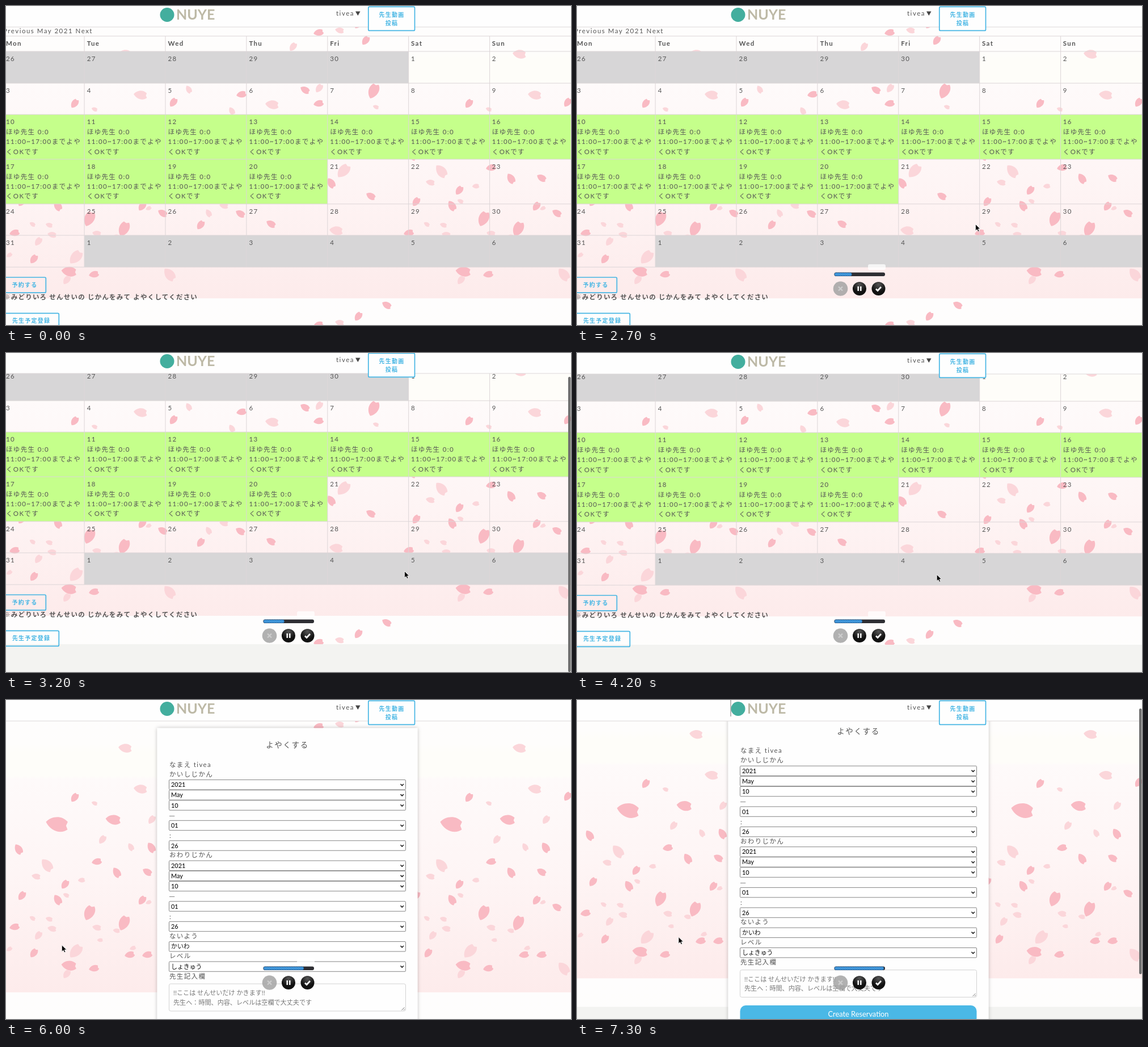
Write an HTML page that moves like this. It is 996 px wide and 562 px high and loops after 7.4 s.

```html
<!DOCTYPE html>
<html lang="ja">
<head>
<meta charset="utf-8">
<title>よやく</title>
<style>
html, body { margin: 0; width: 100%; height: 100%; overflow: hidden; background: #fff; }
svg { display: block; width: 100%; height: 100%; }
text { font: 11.5px Lato, 'Noto Sans CJK JP', 'Noto Sans CJK', sans-serif; letter-spacing: 1.35px; fill: #555; white-space: pre; }
.bold { font-weight: 700; }
.nav { letter-spacing: 1.5px; }
.note { font-weight: 700; letter-spacing: 1.22px; }
.dash { font-family: 'Noto Sans CJK JP', 'Noto Sans CJK', sans-serif; }
.btn { font-size: 10px; font-weight: 700; letter-spacing: 1.2px; fill: #46b6e4; text-anchor: middle; }
.pick { font-size: 10.9px; font-weight: 500; letter-spacing: 0; fill: #111; }
.hint { font-size: 11.1px; letter-spacing: 0; fill: #777; }
.title { font-size: 13.5px; letter-spacing: 1.6px; text-anchor: middle; }
.submit { font-size: 12.8px; letter-spacing: 0; fill: #fff; text-anchor: middle; }
.word { font-size: 25px; font-weight: 700; letter-spacing: 0; fill: #bdb9a6; }
.status { font-size: 8.6px; letter-spacing: .15px; fill: #eee; }
</style>
</head>
<body>
<svg id="stage" viewBox="0 0 996 562" preserveAspectRatio="none"></svg>
<script>
const LOOP = 7400, STEP = 100;
const DARK = '#f9bac3', PALE = '#fbd6da';
const stage = document.getElementById('stage');

const rect = (x, y, w, h, fill, more = '') =>
  `<rect x="${x}" y="${y}" width="${w}" height="${h}" fill="${fill}" ${more}/>`;
const line = (x1, y1, x2, y2, color = '#dcd5d7') =>
  `<path d="M${x1} ${y1}L${x2} ${y2}" stroke="${color}" fill="none"/>`;
// y is the optical middle of the line
const text = (s, x, y, cls = '') => `<text x="${x}" y="${y + 4.2}" class="${cls}">${s}</text>`;
const outline = (x, y, w, h) => rect(x, y, w, h, 'none', 'rx="2" stroke="#46b6e4" stroke-width="1.7"');

// colour, length, angle, centres
const petals = [
  [DARK, 40, 12, [[90, 219]]],
  [DARK, 27, 8, [[189, 211], [111, 468]]],
  [DARK, 28, -66, [[147, 375], [648, 150], [208, 393]]],
  [DARK, 18, -55, [[121, 172], [104, 325], [28, 345], [240, 353], [49, 446], [295, 170], [343, 386], [621, 32], [634, 61]]],
  [DARK, 20, 58, [[22, 263], [256, 260], [195, 304], [91, 352], [573, 312]]],
  [DARK, 18, -12, [[160, 285], [218, 449], [249, 449], [155, 473], [15, 400], [415, 156], [551, 172], [551, 47]]],
  [DARK, 18, 30, [[249, 303], [643, 335], [467, 384], [413, 366], [276, 365], [671, 12], [527, 148]]],
  [PALE, 24, 8, [[237, 157], [469, 174], [582, 396], [210, 85]]],
  [PALE, 28, -48, [[123, 443], [595, 291]]],
  [PALE, 26, 50, [[72, 291], [288, 473]]],
  [PALE, 17, -54, [[57, 415], [107, 483], [170, 246], [257, 211], [506, 72], [552, 145]]],
  [PALE, 15, 60, [[322, 147], [398, 185], [220, 259], [357, 365]]],
  [PALE, 16, 12, [[53, 311], [81, 403], [588, 43], [384, 352], [160, 401]]],
  [PALE, 11, 20, [[156, 182], [652, 178]]]
];

function tile() {
  const shape = 'M-.5 0C-.34-.28 .1-.46 .44-.2L.4-.02L.5.13C.24.42-.24.34-.5 0Z';
  const petal = (x, y, size, angle, color) =>
    `<path d="${shape}" fill="${color}" transform="translate(${x} ${y}) rotate(${angle}) scale(${size})"/>`;
  let marks = petals.map(([color, size, angle, spots]) =>
    spots.map(([x, y]) => petal(x, y, size, angle, color)).join('')).join('');
  // faint small petals between the large ones
  let seed = 7;
  const rnd = () => (seed = seed * 16807 % 2147483647) / 2147483647;
  for (let i = 0; i < 9; i++)
    marks += petal(6 + i * 29 + rnd() * 16, 310 + rnd() * 140, 10 + rnd() * 4, -60 + rnd() * 120, PALE);

  const stops = [[0, '#fefdfd'], [.15, '#fefdfc'], [.18, '#fefdf9'], [.26, '#fefdf9'], [.27, '#fefafa'], [.6, '#fef5f5'], [1, '#fdebeb']]
    .map(([at, c]) => `<stop offset="${at}" stop-color="${c}"/>`).join('');
  return `<linearGradient id="blush" x2="0" y2="1">${stops}</linearGradient>
    <g id="tile">${marks}</g>
    <pattern id="hatch" width="3" height="3" patternUnits="userSpaceOnUse">
      ${rect(0, 0, 3, 3, '#2280cc')}<path d="M0 3L3 0" stroke="#79bdf0"/></pattern>
    <radialGradient id="ink" cy=".2" r=".9"><stop stop-color="#555"/><stop offset=".6" stop-color="#111"/></radialGradient>
    <filter id="soft" x="-10%" width="120%"><feDropShadow dx="0" dy="0" stdDeviation="3" flood-opacity=".25"/></filter>`;
}

function backdrop() {
  let out = '';
  for (const y of [0, 515]) {
    out += rect(0, y, 996, 515, 'url(#blush)');
    for (const x of [-695, 0, 695]) out += `<use href="#tile" x="${x}" y="${y}"/>`;
  }
  return out + rect(0, 565, 996, 300, '#f3f3f1');
}

function calendar() {
  const rows = [80, 136, 191.2, 270, 348.8, 404, 460];
  const colX = c => -4.8 + 142.9 * c;
  let fills = '', words = '', grid = '';
  ['Mon', 'Tue', 'Wed', 'Thu', 'Fri', 'Sat', 'Sun'].forEach((d, c) => {
    words += text(d, 142.8 * c, 66, 'bold');
    if (c) grid += line(colX(c), 53, colX(c), 460);
  });
  for (let i = 0; i < 42; i++) {
    const c = i % 7, r = Math.floor(i / 7), y = rows[r], h = rows[r + 1] - y;
    const day = i - 4, inMonth = day > 0 && day < 32, open = day > 9 && day < 21;
    const num = day < 1 ? day + 30 : day > 31 ? day - 31 : day;
    const x = 142.8 * c;
    if (!inMonth || open) fills += rect(colX(c), y, 142.9, h, open ? '#c5ff8b' : '#d7d6d7');
    words += text(num, x, y + 13);
    if (open) ['ほゆ先生 0:0', '11:00~17:00までよや', 'くOKです'].forEach((s, k) =>
      words += text(s, x, y + 30.3 + 17.4 * k));
  }
  for (const y of [53, ...rows]) grid += line(0, y, 996, y);
  return fills + grid + words + text('Previous May 2021 Next', -5, 44, 'nav')
    + `<g id="book">${outline(-5, 478, 75.3, 27.2)}${text('予約する', 33, 491, 'btn')}</g>`
    + text('※みどりいろ せんせいの じかんをみて よやくしてください', -4, 513, 'note')
    + outline(-5, 541.4, 98.3, 27) + text('先生予定登録', 44.5, 554, 'btn');
}

function picker(s, y) {
  return rect(287.5, y - 8.7, 417, 17.4, '#fff', 'rx="1.5" stroke="#858585"')
    + text(s, 291, y - .2, 'pick')
    + `<path d="M695.5 ${y - 1.3}l2.7 2.8 2.7-2.8" stroke="#222" stroke-width="1.6" fill="none"/>`;
}

function form() {
  const times = y => ['2021', 'May', '10'].map((s, i) => picker(s, y + 18.1 * i)).join('')
    + text('—', 287.5, y + 54, 'dash') + picker('01', y + 71.7) + text(':', 288, y + 89.5) + picker('26', y + 107.2);
  return rect(266.5, 49.5, 459, 700, '#fefefe', 'filter="url(#soft)"')
    + text('よやくする', 496, 80, 'title')
    + text('なまえ tivea', 288, 113.5) + text('かいしじかん', 288, 130.5) + times(149.3)
    + text('おわりじかん', 288, 272.8) + times(291.8)
    + text('ないよう', 288, 415.5) + picker('かいわ', 434.3)
    + text('レベル', 288, 451) + picker('しょきゅう', 469.6)
    + text('先生記入欄', 288, 486.5)
    + rect(287.5, 500, 417, 48, '#fefefe', 'rx="3" stroke="#d2d2d2"')
    + text('!!ここは せんせいだけ かきます!!', 295, 516, 'hint')
    + text('先生へ：時間、内容、レベルは空欄で大丈夫です', 295, 532.6, 'hint')
    + '<path d="M697.5 546.5l5-5M701 546.5l2-2" stroke="#777"/>'
    + rect(287.5, 562.5, 417, 32, '#4ab8e6', 'rx="10"')
    + text('Create Reservation', 496, 578, 'submit');
}

function header() {
  return rect(0, -2, 996, 39, '#fefefe') + line(0, 37, 996, 37, '#ddd8d9')
    + '<circle cx="284" cy="15.5" r="12.5" fill="#43ae9e"/>' + text('NUYE', 300, 20, 'word')
    + text('tivea', 582, 13, 'nav') + '<path d="M616 9.5h8.5l-4.2 7.5z" fill="#444"/>'
    + rect(638.8, 1.4, 81.7, 42, '#fefefe') + outline(638.8, 1.4, 81.7, 42)
    + text('先生動画', 680, 15, 'btn') + text('投稿', 680, 29.3, 'btn');
}

function recorder() {
  const knob = x => `<circle cx="${x}" cy="498" r="12" fill="url(#ink)"/>`;
  return rect(513, 455, 31, 10, '#fff', 'rx="3" opacity=".75"')
    + rect(453.5, 469.5, 89.5, 6.5, '#2e2e33', 'rx="3"')
    + rect(454, 470, 0, 5.5, 'url(#hatch)', 'id="fill" rx="2.5" stroke="#1b5f9e" stroke-width=".6"')
    + '<circle cx="464.5" cy="498" r="12.8" fill="#a3a3a3" opacity=".85"/>'
    + '<path d="M461 494.5l7 7m0-7l-7 7" stroke="#ccc" stroke-width="2.4"/>'
    + knob(498) + '<path d="M495.7 494v8m4.6-8v8" stroke="#fff" stroke-width="2.4"/>'
    + knob(531.5) + '<path d="M527 498.5l3 3 6-6.5" stroke="#fff" stroke-width="2.6" fill="none"/>';
}

stage.innerHTML = `<defs>${tile()}</defs>
  <g id="page">
    <g id="scroll">${backdrop()}<g id="cal">${calendar()}</g><g id="form">${form()}</g></g>
    ${header()}
  </g>
  <g id="caret">${line(271, 0, 271, 29, '#777')}</g>
  ${rect(991, 0, 4.5, 0, '#6f6f6f', 'id="thumb" rx="2.2"')}
  <g id="status">${rect(-4, 550, 173, 14, '#8d8d8d', 'rx="2"')}${text('localhost:3000/tweets/5/reservations/new', -2, 556.5, 'status')}</g>
  <g id="rec">${recorder()}</g>
  <path id="arrow" d="M0 0V11.6L2.7 9.1 4.5 13 6.5 12.1 4.8 8.3H8.4Z" fill="#000" stroke="#fff" stroke-width=".8"/>
  <path id="hand" d="M-2.6 0V-4.6q1.1-1.5 2.2 0V-1.2q1-.9 1.9.1q1-.7 1.8.3q1.3-.5 1.6.8V3.4L3.6 6.4H-1.6L-5-.2q.6-1.4 2.4.8z" fill="#fff" stroke="#111" stroke-width="1"/>`;

const el = {};
stage.querySelectorAll('[id]').forEach(n => el[n.id] = n);
const show = (n, on) => n.setAttribute('display', on ? 'inline' : 'none');
const move = (n, x, y) => n.setAttribute('transform', `translate(${x} ${y})`);
const clamp = v => Math.max(0, Math.min(1, v));
const smooth = (t, a, b) => { const p = clamp((t - a) / (b - a)); return p * p * (3 - 2 * p); };
const mix = (a, b, p) => a + (b - a) * p;

function draw(t) {
  const onForm = t >= 5900;
  const hover = t >= 5000 && !onForm;
  const down = 51 * (1 - (1 - clamp((t - 2700) / 500)) ** 3);
  const formDown = 24.4 * smooth(t, 6900, 7300);

  show(el.cal, !onForm);
  show(el.form, onForm);
  move(el.scroll, 0, -(onForm ? formDown : down));
  move(el.page, 0, t >= 3100 && t < 3400 ? -1 : 0);
  el.book.setAttribute('opacity', hover ? .6 : 1);
  show(el.status, hover);
  show(el.caret, t >= 7300);

  const thumbY = onForm ? 2 + formDown * .535 : 2 + down * .785;
  el.thumb.setAttribute('y', thumbY);
  el.thumb.setAttribute('height', onForm ? 468 : 520);
  show(el.thumb, t > 2700 && t < 3900 || t > 6900);

  show(el.rec, t >= 300);
  el.fill.setAttribute('width', Math.max(0, (t - 240) * .0123));

  const go = smooth(t, 4000, 5000), back = smooth(t, 5700, 6400);
  const x = mix(mix(702.5, 46, go), 179, back);
  const y = mix(mix(384.5, 441, go), 417.6, back);
  move(el.arrow, x, y);
  move(el.hand, x + 3.5, y + 6);
  show(el.arrow, t >= 2500 && !hover);
  show(el.hand, hover);
}

const start = performance.now();
function tick() {
  const t = (performance.now() - start) % LOOP;
  draw(Math.floor(t / STEP) * STEP);
  requestAnimationFrame(tick);
}
tick();
</script>
</body>
</html>
```
